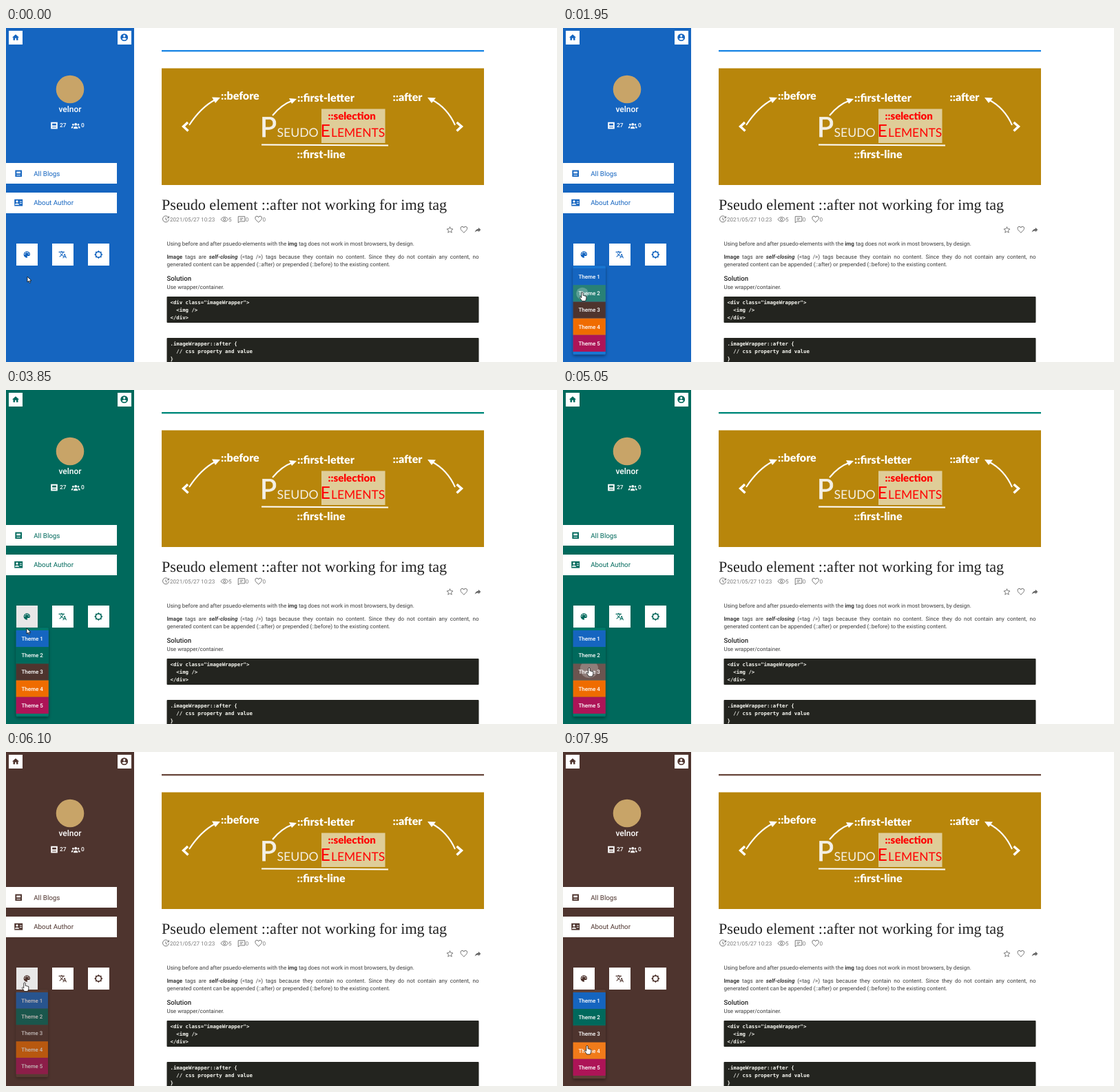
An HTML page for the animation above (8 s loop, 800 by 485 pixels).

```html
<!DOCTYPE html>
<html lang="en">
<head>
<meta charset="utf-8">
<style>
html, body { margin: 0; width: 100%; height: 100%; overflow: hidden; background: #fff; }
body { text-rendering: geometricPrecision; }
svg { position: absolute; left: 0; top: 0; font-family: Roboto, sans-serif; }
.main { fill: var(--main); }
.line { fill: none; stroke-width: 1.8; }
.fun { font: 900 16px Lato, sans-serif; fill: #fff; }
.caps { font-family: Lato, sans-serif; fill: #f4f0e6; }
.body { font-size: 8.06px; fill: #3c3c3c; }
.meta { font-size: 8.1px; fill: #7c7c7c; }
.code { font: bold 7.35px "DejaVu Sans Mono", monospace; fill: #f8f8f2; }
.item { font-size: 8px; font-weight: 500; fill: #fff; text-anchor: middle; }
p { position: absolute; left: 233.5px; top: 326.7px; width: 453px; margin: 0;
    font: 8.06px/11.3px Roboto, sans-serif; color: #3c3c3c; }
p span { display: block; white-space: nowrap; }
p span:first-child { text-align-last: justify; }
</style>
</head>
<body>
<svg width="800" height="485" viewBox="0 0 800 485">
  <rect class="main" width="186" height="485"/>
  <g fill="#fff">
    <rect x="4" y="4" width="20" height="20"/>
    <rect x="162" y="4" width="20" height="20"/>
    <rect y="196" width="161" height="30"/>
    <rect y="239" width="161" height="30"/>
    <rect id="button" x="15" y="313" width="31" height="32"/>
    <rect x="67" y="313" width="31" height="32"/>
    <rect x="119" y="313" width="31" height="32"/>
    <text x="93" y="122" font-size="12" font-weight="500" text-anchor="middle">velnor</text>
    <g font-size="8.4" font-weight="500"><text x="78" y="144.3">27</text><text x="109" y="144.3">0</text></g>
  </g>
  <circle cx="93" cy="89" r="20.3" fill="#c8a468"/>
  <g class="main" font-size="9.8">
    <text x="40.2" y="214.6">All Blogs</text>
    <text x="40.2" y="257">About Author</text>
  </g>

  <rect x="226" y="32" width="468" height="2.4" fill="var(--accent)"/>
  <rect x="226" y="58.5" width="468" height="169.5" fill="#b8860b"/>
  <rect x="458" y="117.5" width="92.5" height="49.5" fill="#dfcd98"/>
  <g fill="none" stroke="#fff" stroke-width="2">
    <path d="M266 141Q283 115 304 104M387 127Q400 111 417 105M652 141Q641 116 618 104M371 169.5L555 170.5"/>
    <path d="M264 137L257.5 143L264.5 149.5M654.5 137L661.5 143L654.5 149.5" stroke-width="3.4"/>
  </g>
  <path fill="#fff" d="M311 101L299 100.5L304 109zM422 103L411 102L415 110zM612 101L624 101.5L618 109z"/>
  <g class="fun">
    <text x="312" y="104">::before</text>
    <text x="423" y="107">::first-letter</text>
    <text x="561.5" y="106">::after</text>
    <text x="422.5" y="189">::first-line</text>
    <text x="467.5" y="132.5" style="font-size:15px;fill:#f00">::selection</text>
  </g>
  <g class="caps">
    <text x="369" y="158" font-size="40" stroke="#f4f0e6" stroke-width=".8">P</text>
    <text x="393.5" y="158" font-size="17.6">SEUDO</text>
    <g fill="#f00"><text x="456.5" y="158" font-size="25">E</text><text x="472" y="158" font-size="17.4">LEMENTS</text></g>
  </g>

  <text x="226" y="264" fill="#222" style="font:22.1px 'Liberation Serif',serif">Pseudo element ::after not working for img tag</text>
  <g class="meta">
    <text x="238" y="280.8">2021/05/27 10:23</text>
    <text x="323" y="280.8">5</text><text x="347.8" y="280.8">0</text><text x="372.5" y="280.8">0</text>
  </g>
  <g class="body">
    <text x="233.5" y="316">Using before and after psuedo-elements with the <tspan font-weight="700">img</tspan> tag does not work in most browsers, by design.</text>
    <text x="233.5" y="367" font-weight="500" style="font-size:9.6px;fill:#222">Solution</text>
    <text x="233.5" y="378.7">Use wrapper/container.</text>
  </g>
  <g fill="#23241f">
    <rect x="233.5" y="390" width="453" height="38" rx="1"/>
    <rect x="233.5" y="450" width="453" height="40" rx="1"/>
  </g>
  <g class="code">
    <text x="238.5" y="400.5">&lt;div class="imageWrapper"&gt;</text>
    <text x="247.3" y="411.5">&lt;img /&gt;</text>
    <text x="238.5" y="422.5">&lt;/div&gt;</text>
    <text x="238.5" y="460.5">.imageWrapper::after {</text>
    <text x="247.3" y="471.5">// css property and value</text>
    <text x="238.5" y="482.5">}</text>
  </g>
  <g id="icons" fill-rule="evenodd"></g>
</svg>
<p><span><b>Image</b> tags are <b><i>self-closing</i></b> (&lt;tag /&gt;) tags because they contain no content. Since they do not contain any content, no</span><span>generated content can be appended (::after) or prepended (::before) to the existing content.</span></p>
<svg width="800" height="485" viewBox="0 0 800 485">
  <defs><clipPath id="clip"><rect id="clipRect" x="14.6" width="47.2" height="24.2"/></clipPath></defs>
  <g id="menu" style="filter:drop-shadow(0 2px 2px #0006)">
    <rect x="14.6" y="345.3" width="47.2" height="129" rx="1.5" fill="var(--panel)"/>
    <g id="items"></g>
    <rect id="hover" x="14.6" width="47.2" height="24.2" fill="#fff"/>
    <g clip-path="url(#clip)"><circle id="ripple" fill="#fff"/></g>
  </g>
  <g id="cursor" fill="#fff" stroke="#111" stroke-width=".8" stroke-linejoin="round">
    <path id="arrow" d="M0 0v8l2-1.7 1.3 3 1.3-.6-1.3-2.8h2.7z"/>
    <path id="hand" d="M-1.2 1Q0-.8 1.2 1V4.8l4.6 1.2v3.8l-1.3 3.2h-4.8l-3.5-5 1-1 1.6 1.3z"/>
  </g>
</svg>
<script>
const $ = id => document.getElementById(id);
const clamp = v => Math.max(0, Math.min(1, v));

// 24-unit icon paths
const shapes = {
  home: 'M10 20v-6h4v6h5v-8h3L12 3 2 12h3v8z',
  user: 'M12 2a10 10 0 1 0 0 20a10 10 0 1 0 0-20zm0 3a3 3 0 1 1 0 6a3 3 0 1 1 0-6zm0 14.2c-2.5 0-4.7-1.3-6-3.2 0-2 4-3.1 6-3.1s6 1.1 6 3.1c-1.3 1.9-3.5 3.2-6 3.2z',
  book: 'M2 2h20v20H2zM6 6v6h12V6zM6 16v2h12v-2z',
  card: 'M1 3h22v18H1zM8 6a3 3 0 1 0 0 6a3 3 0 1 0 0-6zM2 18h12c0-5-12-5-12 0zM15 8v2h6V8zM15 13v2h6v-2z',
  group: 'M12 5a3.5 3.5 0 1 1 0 7a3.5 3.5 0 1 1 0-7zM5 7a2.5 2.5 0 1 1 0 5a2.5 2.5 0 1 1 0-5zM19 7a2.5 2.5 0 1 1 0 5a2.5 2.5 0 1 1 0-5zM6 20c0-8 12-8 12 0zM0 19c0-4 2-6 6-5-2 2-2 3-2 5zM24 19c0-4-2-6-6-5 2 2 2 3 2 5z',
  palette: 'M12 3a9 9 0 0 0 0 18c1.5 0 2-1.5 1.1-2.5-.8-1.1 0-2.5 1.1-2.5H16a5 5 0 0 0 5-5c0-4.4-4-8-9-8z' +
    [[6.5, 10.5], [9.5, 6.5], [14.5, 6.5], [17.5, 10.5]].map(([x, y]) => `M${x - 1.5} ${y}a1.5 1.5 0 1 0 3 0a1.5 1.5 0 1 0-3 0z`).join(''),
  translate: 'M12.87 15.07l-2.51-2.54c1.74-1.94 2.98-4.17 3.71-6.53H17V4h-7V2H8v2H1v2h11.17C11.5 7.92 10.44 9.75 9 11.35 8.07 10.32 7.3 9.19 6.69 8h-2c.73 1.63 1.73 3.17 2.98 4.56l-5.09 5.02L4 19l5-5 3.11 3.11zM18.5 10h-2L12 22h2l1.12-3h4.75L21 22h2zm-2.62 7l1.62-4.33L19.12 17z',
  sun: 'M20 8.7V4h-4.7L12 .7 8.7 4H4v4.7L.7 12 4 15.3V20h4.7l3.3 3.3 3.3-3.3H20v-4.7l3.3-3.3zM12 18a6 6 0 1 1 0-12a6 6 0 1 1 0 12z',
  share: 'M14 9V5l7 7-7 7v-4.1c-5 0-8.5 1.6-11 5.1 1-5 4-10 11-11z',
  heart: 'M12 20C4 13 3 11 3 8.5A4.5 4.5 0 0 1 12 6.5A4.5 4.5 0 0 1 21 8.5C21 11 20 13 12 20z',
  star: 'M12 3l2.6 6.2 6.7.6-5.1 4.4 1.5 6.5L12 17.3l-5.7 3.4 1.5-6.5-5.1-4.4 6.7-.6z',
  clock: 'M20 7a9 9 0 1 0 1 5M21 3v5h-5M12 7v5.5l4 2.5',
  eye: 'M1 12C6 3 18 3 23 12C18 21 6 21 1 12zM8.5 12a3.5 3.5 0 1 0 7 0a3.5 3.5 0 1 0-7 0z',
  comment: 'M2 3h20v15H7l-5 4zM7 8.5h10M7 13h7'
};
const grey = '#666', theme = 'var(--main)';
const placed = [
  ['home', 14, 13.8, 12, theme], ['user', 171.7, 13.7, 13, theme],
  ['book', 70, 141.6, 11.5, '#fff'], ['group', 101.2, 141.8, 13, '#fff'],
  ['book', 18.2, 211.3, 11.5, theme], ['card', 18.2, 253.6, 13, theme],
  ['palette', 30.3, 329, 12.5, theme], ['translate', 82.3, 329, 12.5, theme],
  ['sun', 134.3, 329, 13, theme],
  ['clock', 232, 277.8, 12, grey], ['eye', 317.3, 277.8, 11.5, grey],
  ['comment', 342, 278, 11.5, grey], ['heart', 366.6, 278, 12.5, grey],
  ['star', 644.5, 293, 11.5, grey], ['heart', 664.8, 293, 12.5, grey], ['share', 685, 293, 11.5, grey]
];
const outlined = ['heart', 'star', 'clock', 'eye', 'comment'];
$('icons').innerHTML = placed.map(([name, x, y, size, color]) => {
  const paint = outlined.includes(name) ? `class="line" stroke="${color}"` : `fill="${color}"`;
  return `<path ${paint} d="${shapes[name]}" transform="translate(${x} ${y}) scale(${size / 24}) translate(-12 -12)"/>`;
}).join('');

const top0 = 349, rowH = 24.2;
$('items').innerHTML = ['#1565c0', '#00695c', '#4e342e', '#ef6c00', '#ad1457'].map((color, i) => {
  const y = top0 + i * rowH;
  return `<rect x="14.6" y="${y}" width="47.2" height="${rowH}" fill="${color}"/>
    <text class="item" x="38.2" y="${y + 15}">Theme ${i + 1}</text>`;
}).join('');

// start time, sidebar, rule, menu panel
const themes = [
  [0, '#1565c0', '#1e88e5', '#1976d2'],
  [2040, '#00695c', '#00897b', '#00796b'],
  [5110, '#4e342e', '#6d4c41', '#5d4037']
];
// menu opening and closing times
const sessions = [[400, 2080], [3400, 5150], [6035, 9000]];
const presses = [1890, 4960];
// time and pointer position
const track = [
  [0, 31, 361], [50, 31, 361], [350, 29, 338], [700, 30, 344], [850, 30, 344],
  [1650, 28, 383.5], [2150, 28, 383.5], [2700, 30, 361], [2850, 30, 361],
  [3250, 29, 338], [3400, 29, 338], [3650, 30, 346], [3850, 30, 346],
  [4650, 38, 403], [5250, 38, 403], [5750, 30, 361], [5850, 30, 361],
  [6040, 27, 334.5], [6250, 27, 334.5], [6650, 29, 346], [6700, 29, 346],
  [7500, 34, 410], [7950, 35, 426], [8000, 35, 426]
];

function pointer(t) {
  const i = track.findIndex(k => k[0] > t);
  const [t0, x0, y0] = track[i - 1], [t1, x1, y1] = track[i];
  const p = (t - t0) / (t1 - t0), e = p * p * (3 - 2 * p);
  return [x0 + (x1 - x0) * e, y0 + (y1 - y0) * e];
}

function set(id, attrs) {
  for (const name in attrs) $(id).setAttribute(name, attrs[name]);
}
const shown = on => ({ visibility: on ? 'visible' : 'hidden' });

function draw(t) {
  const [, main, accent, panel] = themes.filter(k => k[0] <= t).pop();
  const vars = document.documentElement.style;
  vars.setProperty('--main', main);
  vars.setProperty('--accent', accent);
  vars.setProperty('--panel', panel);

  const [x, y] = pointer(t);
  const session = sessions.find(([a, b]) => t >= a && t < b + 100);
  const open = session && t < session[1];
  const grow = session ? clamp((t - session[0]) / 120) : 0;
  const scale = 1 - .2 * (1 - grow) ** 3;
  set('menu', {
    opacity: session ? clamp((t - session[0]) / 100) * (1 - clamp((t - session[1]) / 100)) : 0,
    transform: `translate(14.6 345.3) scale(${scale}) translate(-14.6 -345.3)`
  });

  const row = Math.floor((y - top0) / rowH), rowY = top0 + row * rowH;
  const onItem = open && row >= 0 && row < 5;
  const onButton = y > 313 && y < 346.5;
  const age = t - (presses.filter(p => p <= t).pop() ?? -1e4);
  const pressed = age < 400;
  set('button', { fill: onButton ? '#e8e8e8' : '#fff' });
  set('hover', { y: rowY, opacity: pressed ? .16 : .1, ...shown(onItem) });
  set('clipRect', { y: rowY });
  set('ripple', {
    cx: x, cy: y + 2, r: Math.min(40, age * .145),
    opacity: pressed ? .24 * (1 - clamp((age - 200) / 200)) : 0
  });

  const hand = onItem || onButton && (!open || grow < 1);
  set('cursor', { transform: `translate(${x} ${y})` });
  set('hand', shown(hand));
  set('arrow', shown(!hand));
}

const start = performance.now();
function tick() {
  draw((performance.now() - start) % 8000);
  requestAnimationFrame(tick);
}
tick();
</script>
</body>
</html>
```
